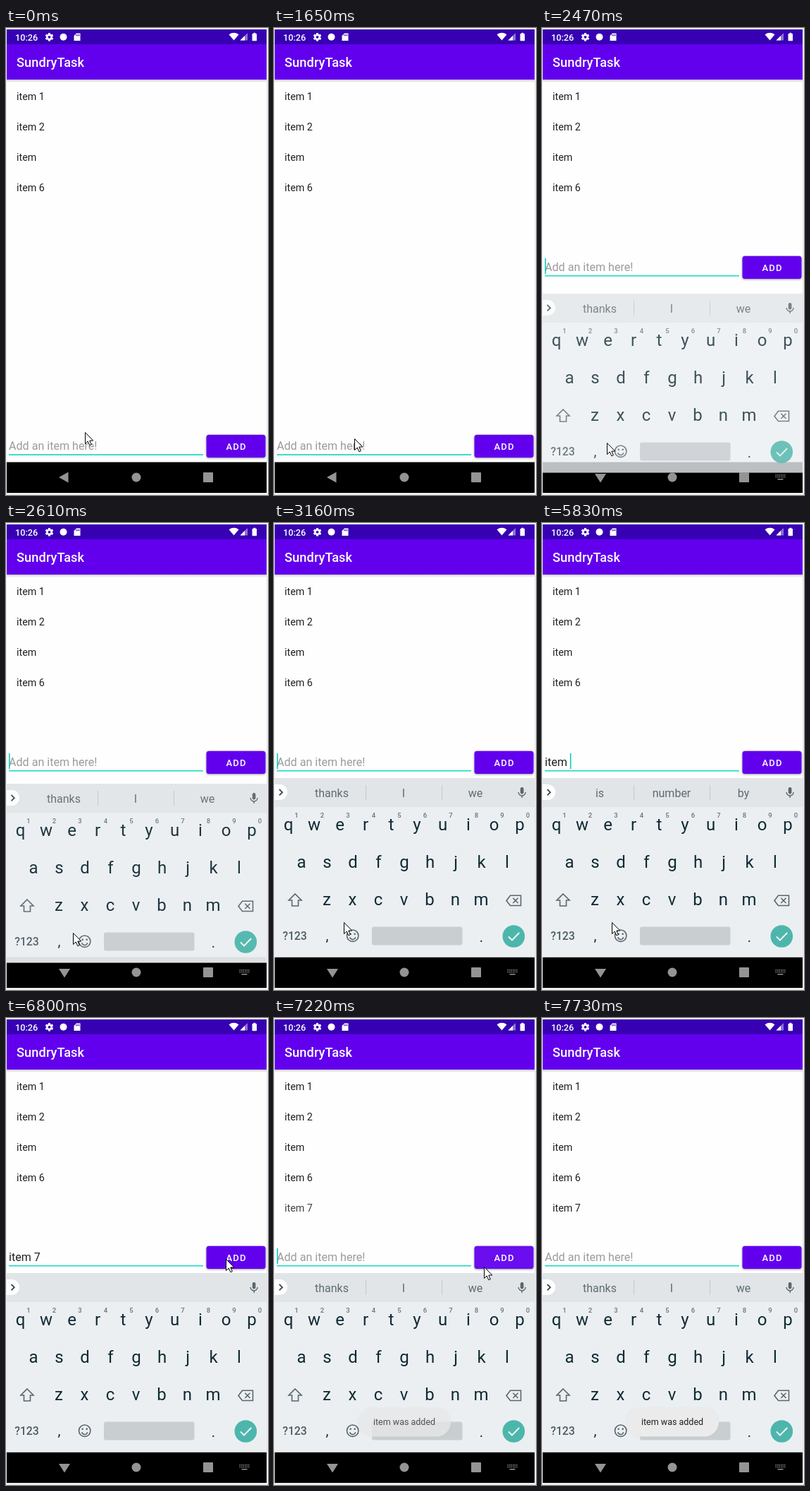
Animation of 372 by 661 pixels, one loop 8000 ms. Source, as an HTML page with a canvas:

```html
<!DOCTYPE html>
<html lang="en">
<head>
<meta charset="utf-8">
<title>Task list</title>
<style>
html, body { margin: 0; width: 100%; height: 100%; overflow: hidden; background: #f0f0f0; }
canvas { display: block; width: 372px; height: 661px; }
</style>
</head>
<body>
<canvas id="stage"></canvas>
<script>
const W = 372, H = 661, LOOP = 8000;
const canvas = document.getElementById('stage');
const ctx = canvas.getContext('2d');
const ratio = window.devicePixelRatio || 1;
canvas.width = W * ratio;
canvas.height = H * ratio;

// Step tracks: [start time, value...]
const POINTER = [
  [0, 112, 572], [1400, 113, 577], [1520, 114, 581], [2080, 107, 584], [2200, 94, 587],
  [2350, 92, 587], [2610, 95, 580], [2900, 99, 565], [6380, 121, 512], [6520, 222, 434],
  [6650, 312, 372], [6800, 312, 341], [7220, 298, 352], [7330, 190, 455], [7450, 62, 588],
  [7580, 19, 619], [7730, -50, -50]
];
const CARET = [
  [0, 0], [150, 1], [710, 0], [1280, 1], [1650, 0], [2200, 1], [2760, 0], [3160, 1],
  [4870, 0], [5270, 1], [6380, 0], [6950, 1], [7450, 0]
];
const TYPED = [
  [0, ''], [3690, 'i'], [3940, 'it'], [4190, 'ite'], [4310, 'item'],
  [5830, 'item '], [5950, 'item 7'], [6950, '']
];
const HINTS = [
  [0, 'thanks', 'I', 'we'], [3690, 'I', 'in', 'is'], [3940, 'it', "it's", 'its'],
  [4190, 'item', 'items', "item's"], [4310, 'item', 'items', 'itemized'],
  [5830, 'is', 'number', 'by'], [5950], [6950, 'thanks', 'I', 'we']
];
const KEYBOARD = [[0, 0, 0], [2350, 30, 0.3], [2470, 15, 0.8], [2610, 8, 0.94], [2760, 0, 1]];
const NEW_ITEM = [[0, 0], [7070, 0.35], [7220, 0.85], [7330, 1]];
const TOAST = [[0, 0], [7070, 0.3], [7220, 0.75], [7330, 1]];
const RIPPLE = [[0, 0], [6950, 0.2], [7070, 0.14], [7220, 0.05], [7330, 0]];

function at(track, t) {
  let hit = track[0];
  for (const step of track) if (step[0] <= t) hit = step;
  return hit.slice(1);
}

function rect(x, y, w, h, color) {
  ctx.fillStyle = color;
  ctx.fillRect(x, y, w, h);
}

function pill(x, y, w, h, r, color) {
  ctx.fillStyle = color;
  ctx.beginPath();
  ctx.roundRect(x, y, w, h, r);
  ctx.fill();
}

function disc(x, y, r, color) {
  ctx.fillStyle = color;
  ctx.beginPath();
  ctx.arc(x, y, r, 0, Math.PI * 2);
  ctx.fill();
}

function trace(points, closed) {
  ctx.beginPath();
  for (let i = 0; i < points.length; i += 2) ctx.lineTo(points[i], points[i + 1]);
  if (closed) ctx.closePath();
}

function shape(points, color) {
  trace(points, true);
  ctx.fillStyle = color;
  ctx.fill();
}

function line(points, color, width, closed = false) {
  trace(points, closed);
  ctx.strokeStyle = color;
  ctx.lineWidth = width;
  ctx.stroke();
}

function text(str, x, y, size, color, { weight = 400, align = 'left', gap = 0 } = {}) {
  ctx.font = `${weight} ${size}px Roboto, sans-serif`;
  ctx.letterSpacing = gap + 'px';
  ctx.textAlign = align;
  ctx.fillStyle = color;
  ctx.fillText(str, x, y);
  const width = ctx.measureText(str).width;
  ctx.letterSpacing = '0px';
  return width;
}

function gear(x, y) {
  ctx.save();
  ctx.translate(x, y);
  for (let i = 0; i < 6; i++) {
    rect(-1.5, -5.8, 3, 4, '#fff');
    ctx.rotate(Math.PI / 3);
  }
  ctx.restore();
  disc(x, y, 4.4, '#fff');
  disc(x, y, 1.9, '#3700b3');
}

function statusBar() {
  rect(1, 2, 369, 21, '#3700b3');
  text('10:26', 13, 17.5, 12.7, '#fff', { weight: 500 });
  gear(61.5, 12.8);
  disc(81.5, 12.8, 5, '#fff');
  shape([100, 7.5, 105.5, 7.5, 105.5, 18, 96.5, 18, 96.5, 11], '#fff');
  for (const x of [99.3, 101.3, 103.3]) rect(x, 9, 1, 2.4, '#3700b3');

  ctx.beginPath();
  ctx.moveTo(323.5, 17.5);
  ctx.lineTo(316.5, 9.2);
  ctx.quadraticCurveTo(323.5, 4.5, 330.5, 9.2);
  ctx.fillStyle = '#fff';
  ctx.fill();
  shape([343, 7, 343, 17.5, 332.5, 17.5], '#8f75d3');
  shape([339, 11, 339, 17.5, 332.5, 17.5], '#fff');
  pill(349.5, 8, 6.5, 10.3, 0.8, '#fff');
  rect(351.3, 6.8, 3, 2, '#fff');
}

function appBar() {
  const shade = ctx.createLinearGradient(0, 73, 0, 77);
  shade.addColorStop(0, 'rgba(0,0,0,.2)');
  shade.addColorStop(1, 'rgba(0,0,0,0)');
  rect(1, 73, 369, 4, shade);
  rect(1, 23, 369, 50, '#6200ee');
  text('SundryTask', 15, 55, 18.2, '#fff', { weight: 500, gap: 0.1 });
}

function list(t) {
  ['item 1', 'item 2', 'item', 'item 6', 'item 7'].forEach((label, i) => {
    ctx.globalAlpha = i < 4 ? 1 : at(NEW_ITEM, t)[0];
    text(label, 15, 102 + i * 43, 14.3, '#202020');
  });
  ctx.globalAlpha = 1;
}

function entryRow(t, raised) {
  const [typed] = at(TYPED, t);
  ctx.save();
  ctx.translate(0, raised ? -253 : 0);
  let end = 4;
  if (typed) {
    const width = text(typed, 4, 596.5, 16.1, '#212121');
    end += width;
    if (t < 5830) rect(4, 598, width, 1, '#333');
  } else {
    text('Add an item here!', 4, 596.5, 16.1, '#9b9b9b');
  }
  rect(4, 603, 276, raised ? 1.5 : 2, raised ? '#16d9c6' : '#3cdccb');
  if (at(CARET, t)[0]) rect(end, 579, 1.6, 22, '#03cfbc');

  ctx.shadowColor = 'rgba(0,0,0,.4)';
  ctx.shadowBlur = 3 * ratio;
  ctx.shadowOffsetY = ratio;
  pill(284.5, 575.7, 84, 32.3, 3.5, '#6200ee');
  ctx.shadowColor = 'transparent';
  const glow = at(RIPPLE, t)[0];
  if (glow) pill(284.5, 575.7, 84, 32.3, 3.5, `rgba(255,255,255,${glow})`);
  text('ADD', 312.5, 597, 13, '#fff', { weight: 500, gap: 1.15 });
  ctx.restore();
}

function suggestions(t) {
  rect(1, 361, 369, 41, '#e1e5e8');
  pill(1, 370, 18, 22, [0, 11, 11, 0], '#fff');
  line([7.5, 377, 11.8, 381.2, 7.5, 385.4], '#37474f', 1.8);
  const words = at(HINTS, t);
  words.forEach((word, i) => text(word, 82 + i * 102, 387.5, 16, '#5f6b72', { align: 'center' }));
  if (words.length) for (const x of [130, 238]) rect(x, 371, 1, 21, '#c2c8cb');

  pill(349.8, 374, 4.6, 9.5, 2.3, '#5a666d');
  ctx.beginPath();
  ctx.arc(352.1, 381, 5, 0, Math.PI);
  ctx.strokeStyle = '#5a666d';
  ctx.lineWidth = 1.4;
  ctx.stroke();
  rect(351.4, 385.8, 1.4, 3.2, '#5a666d');
}

function keyRow(letters, x, y) {
  [...letters].forEach((key, i) => text(key, x + i * 36.5, y, 24, '#102a33', { align: 'center' }));
}

function smiley(x, y) {
  const ink = '#59666d';
  ctx.strokeStyle = ink;
  ctx.lineWidth = 1.6;
  ctx.beginPath();
  ctx.arc(x, y, 8.2, 0, Math.PI * 2);
  ctx.stroke();
  ctx.beginPath();
  ctx.arc(x, y + 1, 4.2, 0.25, Math.PI - 0.25);
  ctx.stroke();
  disc(x - 3, y - 2.4, 1.3, ink);
  disc(x + 3, y - 2.4, 1.3, ink);
}

function keyboard(t) {
  const ink = '#59666d';
  rect(1, 401, 369, 213.5, '#ebeff2');
  suggestions(t);
  keyRow('qwertyuiop', 20.5, 435);
  keyRow('asdfghjkl', 39, 488);
  keyRow('zxcvbnm', 75, 541);
  [...'1234567890'].forEach((n, i) =>
    text(n, 32 + i * 36.5, 417, 9.5, '#66737a', { align: 'center', weight: 500 }));

  line([30, 525, 39, 534, 34.5, 534, 34.5, 542, 25.5, 542, 25.5, 534, 21, 534], ink, 1.6, true);
  line([335.5, 527.2, 350.5, 527.2, 350.5, 541.5, 335.5, 541.5, 330, 534.4], ink, 1.6, true);
  line([339.3, 530.8, 346.5, 538], ink, 1.6);
  line([346.5, 530.8, 339.3, 538], ink, 1.6);

  text('?123', 29.5, 590.3, 15.8, '#4d5c64', { align: 'center', weight: 500 });
  text(',', 75.5, 591, 20, '#102a33', { align: 'center' });
  smiley(111.7, 584.2);
  pill(139, 571.5, 128.5, 26, 3, '#c9ced1');
  text('.', 294.5, 593, 20, '#102a33', { align: 'center' });
  disc(340.3, 585, 15.8, '#4db6ac');
  line([333, 585.5, 338, 590.5, 348.2, 580], '#fff', 1.8);
}

function navIcons(raised) {
  const gray = '#949494';
  shape(raised ? [75, 631, 91, 631, 83, 643.5] : [88.5, 628.5, 88.5, 643.5, 75, 636], gray);
  disc(185, 636, 6.5, gray);
  pill(280, 629, 14, 14, 0.8, gray);
  if (!raised) return;
  for (let row = 0; row < 2; row++)
    for (let i = 0; i < 6; i++) rect(331.5 + i * 2.5, 632 + row * 2.8, 1.4, 1.5, gray);
  rect(334.5, 638, 8, 1.5, gray);
}

function toast(t) {
  const alpha = at(TOAST, t)[0];
  if (!alpha) return;
  ctx.save();
  ctx.globalAlpha = alpha;
  ctx.shadowColor = 'rgba(0,0,0,.06)';
  ctx.shadowBlur = 2 * ratio;
  pill(119, 552, 132, 40.5, 20.2, '#ebebec');
  ctx.shadowColor = 'transparent';
  text('item was added', 185, 576, 12.5, '#202020', { align: 'center' });
  ctx.restore();
}

function pointer(t) {
  const [x, y] = at(POINTER, t);
  ctx.save();
  ctx.translate(x + 0.5, y + 0.5);
  const arrow = [0, 0, 0, 16, 3.7, 12.5, 6.4, 18.3, 8.8, 17.2, 6.3, 11.5, 11.3, 11.5];
  shape(arrow, '#fff');
  line(arrow, '#000', 1, true);
  ctx.restore();
}

function draw(t) {
  const raised = t >= 2350;
  const [drop, alpha] = at(KEYBOARD, t);
  ctx.setTransform(ratio, 0, 0, ratio, 0, 0);
  rect(0, 0, W, H, '#f0f0f0');
  rect(1, 2, 369, 656, '#fefefe');
  rect(370, 73, 1, 542, '#e4e4e4');
  appBar();
  statusBar();
  list(t);
  entryRow(t, raised);
  rect(1, 614.5, 369, 43.5, '#000');
  if (raised) {
    ctx.save();
    ctx.globalAlpha = alpha;
    ctx.translate(0, drop);
    keyboard(t);
    ctx.restore();
  }
  navIcons(raised);
  toast(t);
  pointer(t);
}

const start = performance.now();
function tick() {
  draw((performance.now() - start) % LOOP);
  requestAnimationFrame(tick);
}
tick();
</script>
</body>
</html>
```
